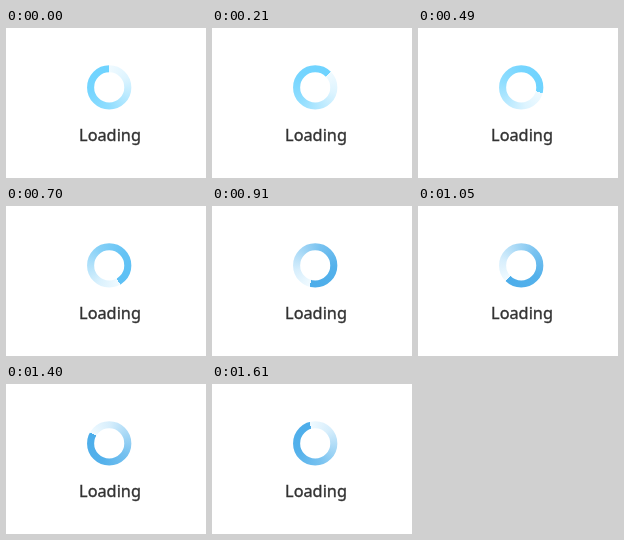
Recreate the animation shown at these times as an HTML page with a canvas. Size 200 by 150 pixels, loop 1680 ms.

```html
<!DOCTYPE html>
<html lang="en">
<head>
<meta charset="utf-8">
<title>Loading</title>
<style>
  html, body { margin: 0; width: 100%; height: 100%; overflow: hidden; background: #fff; }
  canvas { display: block; width: 200px; height: 150px; }
</style>
</head>
<body>
<canvas id="stage" width="200" height="150"></canvas>
<script>
const ctx = document.getElementById('stage').getContext('2d');
const STEP_MS = 70, STEPS = 24;
const CENTER = { x: 103.2, y: 59.4 }, RADIUS = 18.6, THICKNESS = 7.1;
const PALE = [240, 250, 255], CYAN = [110, 211, 255], BLUE = [76, 173, 234];
// Position along the ring, then strength of the colour there
const FADE = [[0, 0], [0.17, 0.15], [0.33, 0.43], [0.5, 0.73], [0.72, 0.95], [1, 1]];

const mix = (a, b, t) => a.map((v, i) => v + (b[i] - v) * t);
const css = rgb => `rgb(${rgb.map(Math.round).join(',')})`;
const clamp = v => Math.min(1, Math.max(0, v));

function drawRing(step) {
  const angle = step / STEPS * 2 * Math.PI - Math.PI / 2;
  const color = mix(CYAN, BLUE, clamp((step - 7) / 6));
  const gradient = ctx.createConicGradient(angle, CENTER.x, CENTER.y);
  for (const [at, strength] of FADE) {
    gradient.addColorStop(at, css(mix(PALE, color, strength)));
  }
  ctx.strokeStyle = gradient;
  ctx.lineWidth = THICKNESS;
  ctx.beginPath();
  ctx.arc(CENTER.x, CENTER.y, RADIUS, 0, 2 * Math.PI);
  ctx.stroke();
}

function drawLabel() {
  ctx.fillStyle = ctx.strokeStyle = '#333';
  ctx.font = '16.3px "Noto Sans", "Open Sans", sans-serif';
  ctx.lineWidth = 0.35;
  ctx.fillText('Loading', 73.1, 113);
  ctx.strokeText('Loading', 73.1, 113);
}

function draw(now) {
  ctx.fillStyle = '#fff';
  ctx.fillRect(0, 0, 200, 150);
  drawRing(Math.floor(now / STEP_MS) % STEPS);
  drawLabel();
}

let start;
function tick(now) {
  start ??= now;
  draw(now - start);
  requestAnimationFrame(tick);
}
draw(0);
requestAnimationFrame(tick);
</script>
</body>
</html>
```
